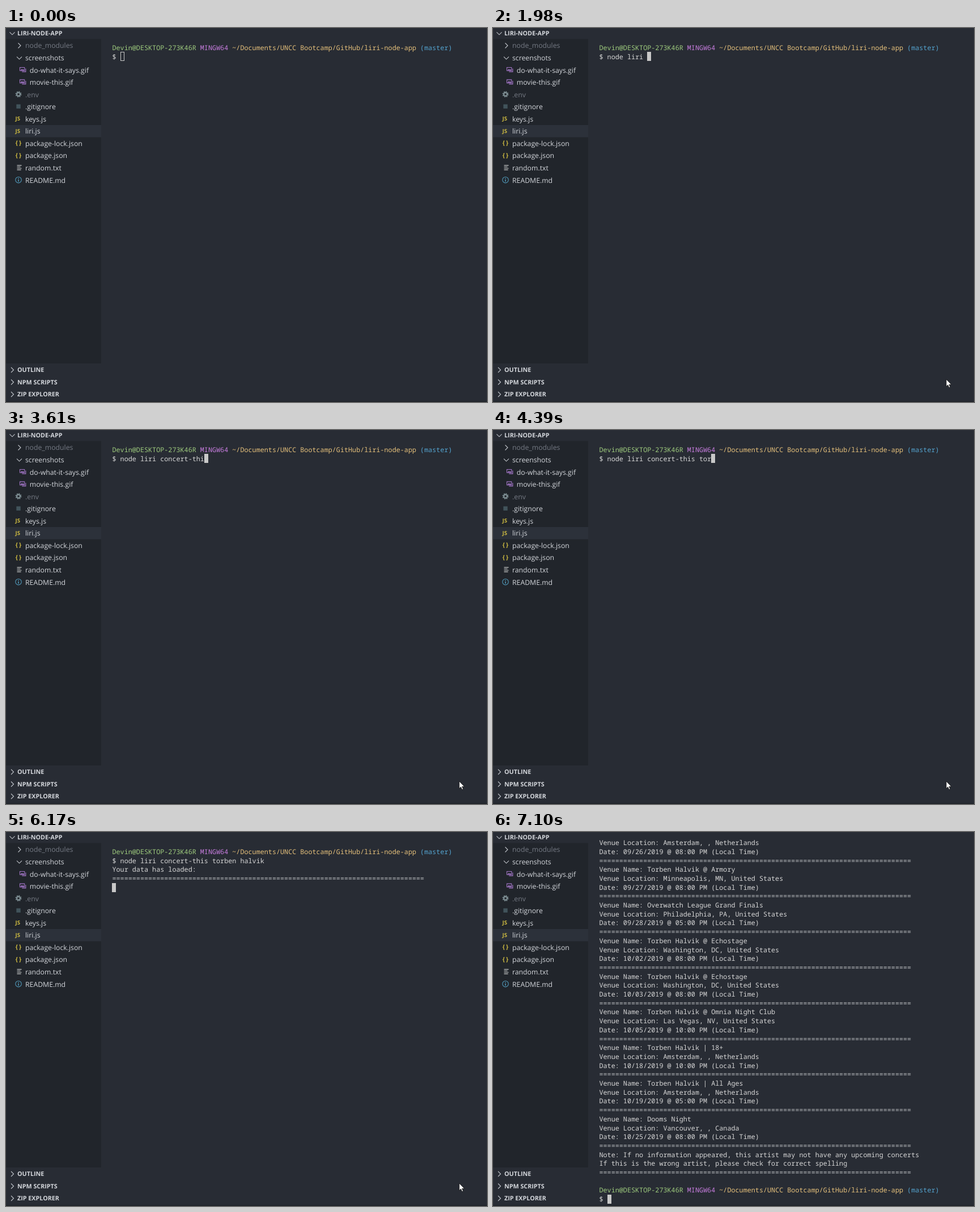
Write an HTML page that moves like this. It is 849x659 px and loops after 8000 ms.

```html
<!DOCTYPE html>
<html lang="en">
<head>
<meta charset="utf-8">
<title>Terminal session</title>
<style>
  html, body { margin: 0; width: 100%; height: 100%; overflow: hidden; background: #282c34; }
  svg { display: block; width: 100%; height: 100%; }
  text { white-space: pre; text-rendering: geometricPrecision; }
  .term text { font: 500 11.77px "Noto Sans Mono", monospace; fill: #d6d6d6; }
  .tree text { font: 12.25px "Open Sans", sans-serif; fill: #d3d6db; }
  .tree .dim { fill: #757a84; }
  .tree .head { font-size: 10.75px; font-weight: 700; }
  .tree .js { font: 700 9.6px "Open Sans", sans-serif; fill: #cbb841; }
  .tree .braces { font: 700 10.6px "Noto Sans Mono", monospace; fill: #cbb841; }
  .chev { fill: none; stroke: #c0c4ca; stroke-width: 1.1; }
</style>
</head>
<body>
<svg id="stage" viewBox="0 0 849 659" preserveAspectRatio="none">
  <rect width="849" height="659" fill="#282c34"/>
  <rect y="19.5" width="168" height="571.5" fill="#21252b"/>
  <rect y="171" width="168" height="21.5" fill="#2c313a"/>
  <rect y="657.3" width="849" height="1.7" fill="#1f2329"/>
  <g class="tree" id="tree"></g>
  <g class="term">
    <g id="lines"></g>
    <rect id="caret"/>
  </g>
  <path id="mouse" d="M0 0V12.6L2.9 9.9 4.9 14.6 7 13.7 5 9.2H9Z" fill="#fff" stroke="#111" stroke-width=".8"/>
</svg>
<script>
const LOOP = 8000;
const X0 = 187.5, COL = 7.062, Y0 = 19, ROW = 15.7;
const $ = id => document.getElementById(id);

// ---- file tree ----
const chevron = (x, y, open) =>
  `<path class="chev" d="${open ? `M${x - 4.5} ${y - 2}l4.5 4.5 4.5-4.5` : `M${x - 2} ${y - 4.5}l4.5 4.5-4.5 4.5`}"/>`;
const label = (x, y, text, cls = "") => `<text x="${x}" y="${y}" class="${cls}">${text}</text>`;

const icons = {
  closed: y => chevron(23.5, y, false),
  open: y => chevron(23.5, y, true),
  image: y => `<path d="M24.5 ${y - 4.6}h8.2v5.8h-8.2z" fill="none" stroke="#a074c4" stroke-width="1.1"/>
    <path d="M25.5 ${y + .6}l2.3-2.8 1.8 1.6 1.5-1 1 2.2zM28.2 ${y + 2.5}h6v-5h1.2v6.2h-7.2z" fill="#a074c4"/>`,
  gear: y => `<circle cx="22" cy="${y - .5}" r="3" fill="none" stroke="#7b8b90" stroke-width="2.3"/>
    <circle cx="22" cy="${y - .5}" r="4.7" fill="none" stroke="#7b8b90" stroke-width="1.6" stroke-dasharray="1.9 1.79"/>`,
  square: y => `<rect x="18.3" y="${y - 4.3}" width="7.4" height="7.4" fill="#41535b"/>`,
  js: y => label(16.6, y + 3, "JS", "js"),
  braces: y => label(15.6, y + 3, "{}", "braces"),
  text: y => `<path d="M19.5 ${y - 4.5}h8M19.5 ${y - 1.9}h6M19.5 ${y + .7}h8M19.5 ${y + 3.3}h7" stroke="#c9cccc" stroke-width="1.1"/>`,
  info: y => `<circle cx="22" cy="${y - .5}" r="5.2" fill="none" stroke="#519aba" stroke-width="1.1"/>
    <path d="M22 ${y - 3.6}v1.5M22 ${y - 1.2}v3.8" stroke="#519aba" stroke-width="1.5"/>`
};

const files = [
  ["closed", "node_modules", "dim"], ["open", "screenshots"],
  ["image", "do-what-it-says.gif"], ["image", "movie-this.gif"],
  ["gear", ".env", "dim"], ["square", ".gitignore"],
  ["js", "keys.js"], ["js", "liri.js"],
  ["braces", "package-lock.json"], ["braces", "package.json"],
  ["text", "random.txt"], ["info", "README.md"]
];
const header = (y, text, open) => chevron(11, y, open) + label(20, y + 3.9, text, "head");

$("tree").innerHTML =
  header(9.3, "LIRI-NODE-APP", true) +
  files.map(([icon, name, cls], i) => {
    const y = 31 + 21.56 * i;
    return icons[icon](y) + label(icon === "image" ? 41.8 : 34, y + 4.4, name, cls);
  }).join("") +
  ["OUTLINE", "NPM SCRIPTS", "ZIP EXPLORER"].map((s, i) => header(602.5 + 21.5 * i, s, false)).join("");

// ---- terminal text ----
const span = (color, s) => `<tspan fill="${color}">${s}</tspan>`;
const PROMPT = [
  span("#9dca7d", "Devin@DESKTOP-273K46R"), span("#c97ee0", "MINGW64"),
  span("#e5c07b", "~/Documents/UNCC Bootcamp/GitHub/liri-node-app"), span("#54a4d0", "(master)")
].join(" ");
const RULE = span("#bcbec1", "=".repeat(78));
const ARTIST = "Torben Halvik";
const COMMAND = "node liri concert-this " + ARTIST.toLowerCase();

const shows = [
  [ARTIST + " 4 War Child", "Amsterdam, , Netherlands", "09/26", "08"],
  [ARTIST + " @ Armory", "Minneapolis, MN, United States", "09/27", "08"],
  ["Overwatch League Grand Finals", "Philadelphia, PA, United States", "09/28", "05"],
  [ARTIST + " @ Echostage", "Washington, DC, United States", "10/02", "08"],
  [ARTIST + " @ Echostage", "Washington, DC, United States", "10/03", "08"],
  [ARTIST + " @ Omnia Night Club", "Las Vegas, NV, United States", "10/05", "10"],
  [ARTIST + " | 18+", "Amsterdam, , Netherlands", "10/18", "10"],
  [ARTIST + " | All Ages", "Amsterdam, , Netherlands", "10/19", "05"],
  ["Dooms Night", "Vancouver, , Canada", "10/25", "08"]
];
const results = shows.flatMap(([name, place, day, hour]) => [
  RULE, "Venue Name: " + name, "Venue Location: " + place,
  `Date: ${day}/2019 @ ${hour}:00 PM (Local Time)`
]).concat(
  RULE,
  "Note: If no information appeared, this artist may not have any upcoming concerts",
  "If this is the wrong artist, please check for correct spelling",
  RULE
);

// Bursts of typing: first key, last key, number of keys
const bursts = [
  [970, 1980, 10], [2130, 3000, 7], [3230, 3610, 4], [3780, 4240, 4],
  [4390, 5100, 6], [5330, 5330, 1], [5480, 5890, 4]
];
const ENTER = 6030, LOADED = 6170, LISTED = 6720, DONE = 6800;
const FOCUS = 600, MOUSE_IN = 210, MOUSE_OUT = 7100;

function typedCount(t) {
  return bursts.reduce((sum, [from, to, n]) => {
    if (t < from) return sum;
    if (t >= to) return sum + n;
    return sum + 1 + Math.floor((t - from) / (to - from) * (n - 1));
  }, 0);
}

// Visible rows and caret cell at time t
function screen(t) {
  if (t >= DONE) return { rows: [...results.slice(2), "", PROMPT, "$ "], col: 2, row: 40 };
  if (t >= LISTED) return { rows: results, col: 0, row: 40 };
  const n = typedCount(t);
  const rows = ["", PROMPT, "$ " + COMMAND.slice(0, n)];
  if (t >= LOADED) return { rows: [...rows, "Your data has loaded:", RULE], col: 0, row: 5 };
  if (t >= ENTER) return { rows, col: 0, row: 3 };
  return { rows, col: 2 + n, row: 2 };
}

function set(el, attrs) {
  for (const k in attrs) el.setAttribute(k, attrs[k]);
}

let shown = "";
function draw(t) {
  const { rows, col, row } = screen(t);
  const html = rows.map((s, i) => s && label(X0, (Y0 + ROW * i + 4.1).toFixed(2), s)).join("");
  if (html !== shown) $("lines").innerHTML = shown = html;

  const x = Math.round(X0 + col * COL - .1), y = Math.round(Y0 + row * ROW - 8);
  set($("caret"), t < FOCUS
    ? { x: x + .5, y: y + .5, width: 6, height: 15, fill: "none", stroke: "#c8c8c8" }
    : { x, y, width: 7, height: 16, fill: "#c8c8c8", stroke: "none" });

  // The pointer slides in from below in short steps
  const p = Math.min(1, Math.max(0, Math.floor((t - MOUSE_IN) / 78) / 4));
  const left = (1 - p) ** 2;
  set($("mouse"), {
    transform: `translate(${800 + 1.5 * left} ${619 + 23.5 * left})`,
    visibility: t >= MOUSE_IN && t < MOUSE_OUT ? "visible" : "hidden"
  });
}

const start = performance.now();
function tick() {
  draw((performance.now() - start) % LOOP);
  requestAnimationFrame(tick);
}
tick();
</script>
</body>
</html>
```
